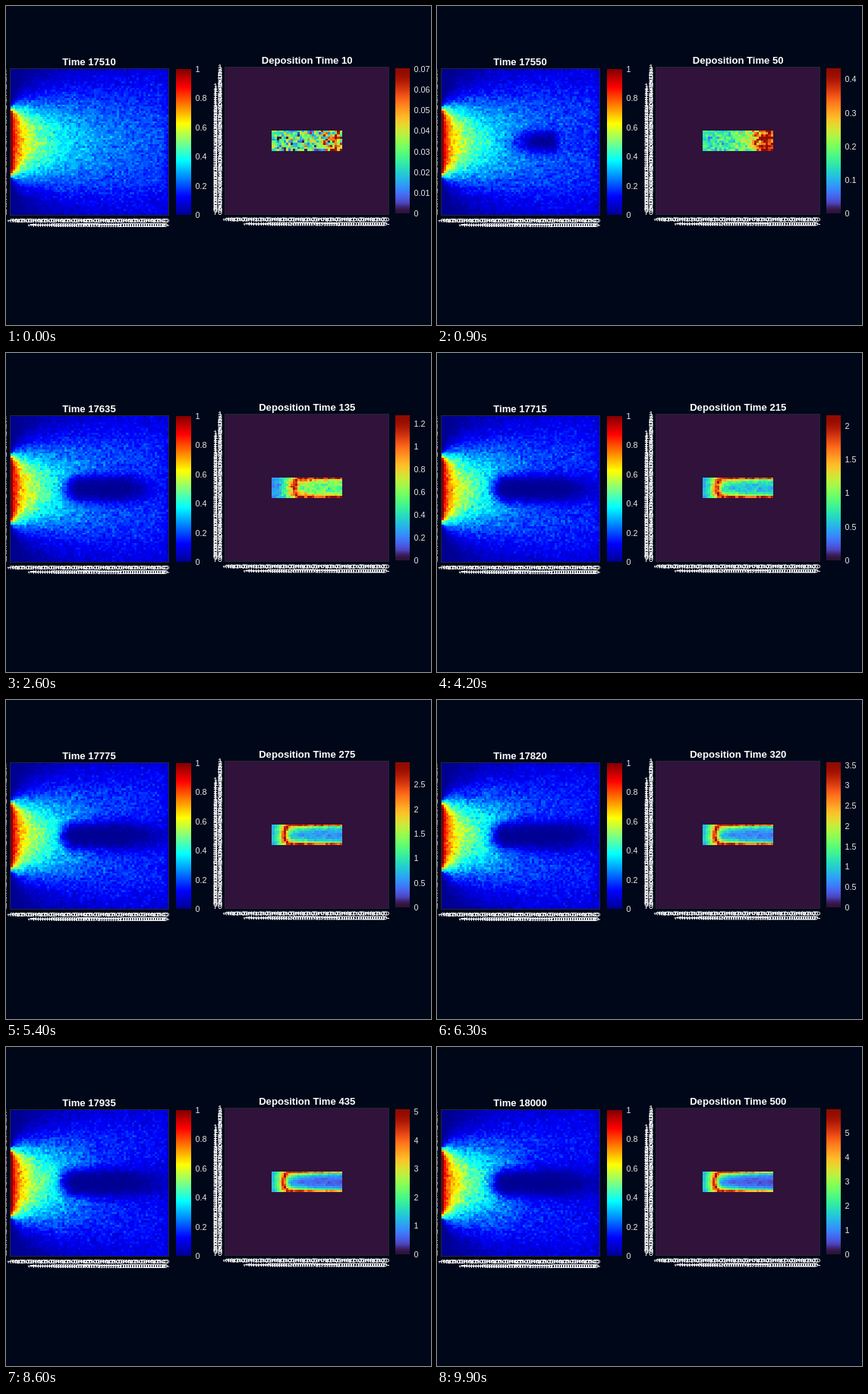
An HTML page with a canvas for the animation above (10 s loop, 560 px wide and 420 px high).

```html
<!DOCTYPE html>
<html lang="en">
<head>
<meta charset="utf-8">
<title>Deposition</title>
<style>
html, body { margin: 0; width: 100%; height: 100%; overflow: hidden; background: #000718; }
canvas { display: block; }
</style>
</head>
<body>
<canvas id="stage" width="560" height="420"></canvas>
<script>
const ctx = document.getElementById('stage').getContext('2d');
const FONT = '"Liberation Sans", Arial, sans-serif';
const N = 70, MID = (N - 1) / 2;
const LEFT = { x: 6, y: 83, w: 208, h: 192 };
const RIGHT = { x: 289, y: 81, w: 215, h: 192.5 };
const BLOCK = { i: 20, j: 30, w: 30, h: 10 };

const clamp = v => Math.max(0, Math.min(1, v));
const sigmoid = v => 1 / (1 + Math.exp(-v));
const bell = v => Math.exp(-v * v);

// how far the deposit has eaten its way to the left, 0 to 1
const progress = step => 1 / (1 + Math.pow(95 / step, 3.6));
const scaleTop = step =>
  0.0706 * Math.pow(step / 10, 1.134) * (1 - 0.07 * bell((step - 175) / 95));
const tickStep = top => {
  const unit = Math.pow(10, Math.floor(Math.log10(top / 7.2)));
  return unit * [1, 2, 5, 10].find(k => top / (k * unit) <= 7.2);
};

function random(seed) {
  return () => {
    seed = (seed + 0x6D2B79F5) | 0;
    let t = Math.imul(seed ^ (seed >>> 15), 1 | seed);
    t = (t + Math.imul(t ^ (t >>> 7), 61 | t)) ^ t;
    return ((t ^ (t >>> 14)) >>> 0) / 4294967296;
  };
}
const normal = rnd => (rnd() + rnd() + rnd() - 1.5) * 2;

function jet(v) {
  const u = 4 * clamp(v);
  const part = c => Math.round(255 * clamp(1.5 - Math.abs(u - c)));
  const blue = u < 0.5 ? Math.round(143 + 224 * u) : part(1);
  return `rgb(${part(3)},${part(2)},${blue})`;
}

const poly = (x, c) => c.reduceRight((sum, k) => sum * x + k, 0);
const TURBO = [
  [0.1357, 4.6154, -42.6603, 132.1311, -152.9424, 59.2864],
  [0.0914, 2.1942, 4.843, -14.185, 4.2773, 2.8296],
  [0.1067, 12.6419, -60.582, 110.3628, -89.9031, 27.3482]
];
const DARK = [48, 18, 59];
function turbo(v) {
  v = clamp(v);
  const mix = Math.min(1, v / 0.07);
  const rgb = TURBO.map((c, n) =>
    Math.round(DARK[n] + (255 * clamp(poly(v, c)) - DARK[n]) * mix));
  return `rgb(${rgb})`;
}

// undisturbed plume leaving the left wall
function plume(i, j) {
  const a = 44, d = i * LEFT.w / N, y = (j - MID) * LEFT.h / N;
  const axis = 1 / (1 + Math.pow(d / 35, 0.8));
  const w = 4.2 * Math.pow(d + 1.5, 0.62);
  const erf = v => Math.tanh(1.2 * v);
  const side = (erf((a - y) / w) + erf((a + y) / w)) / (2 * erf(a / w));
  return axis * side * (1 - 0.4 * Math.exp((d - LEFT.w) / 6));
}

const grainRnd = random(41);
const grain = Array.from({ length: BLOCK.w * BLOCK.h }, () => normal(grainRnd));

function cell(box, i, j, colour) {
  const x0 = Math.round(box.x + i * box.w / N), x1 = Math.round(box.x + (i + 1) * box.w / N);
  const y0 = Math.round(box.y + j * box.h / N), y1 = Math.round(box.y + (j + 1) * box.h / N);
  ctx.fillStyle = colour;
  ctx.fillRect(x0, y0, x1 - x0, y1 - y0);
}

function drawPlume(step) {
  const grown = progress(step), spread = Math.sqrt(grown), age = step / 500;
  const power = 1 - Math.exp(-Math.pow(step / 30, 3));
  const radius = 4 + 2.5 * spread;
  const nose = 47 - 25 * spread + radius;
  const lead = 0.4 + 0.6 * grown;
  const taper = 1.63 - 1.3 * spread;
  const wake = power * (0.2 + 0.3 * age), wakeWidth = 8.5 + 12.7 * age;
  const rnd = random(step * 977);
  for (let j = 0; j < N; j++) {
    for (let i = 0; i < N; i++) {
      const dy = j - MID;
      const dx = Math.max(0, nose - i) * lead + Math.max(0, i - 47) * taper;
      const hole = power * sigmoid((radius - Math.hypot(dx, dy)) / 1.4);
      const trail = wake * bell(dy / wakeWidth) * sigmoid((i - 33) / 4);
      let v = plume(i, j) * (1 - hole) * (1 - trail);
      v += normal(rnd) * 0.08 * Math.sqrt(Math.max(0, v * (1 - v)));
      cell(LEFT, i, j, jet(v));
    }
  }
}

function drawDeposit(step, top) {
  const grown = progress(step);
  const front = 26.5 - 22.2 * grown;
  const peak = 0.95 - 0.4 * Math.exp(-step / 30);
  const base = 0.35 - 0.33 * grown;
  const reach = 9 - 4.2 * grown;
  const floor = Math.min(peak, 0.5 / top);
  const noise = 0.32 * Math.sqrt(10 / step);
  ctx.fillStyle = turbo(0);
  ctx.fillRect(RIGHT.x, RIGHT.y, RIGHT.w, 193);
  for (let j = 0; j < BLOCK.h; j++) {
    for (let i = 0; i < BLOCK.w; i++) {
      const dx = Math.max(0, front + 3.2 - i) * 1.45;
      const depth = 4.7 - Math.hypot(dx, j - 4.5);
      const along = Math.max(0, i - front);
      const rim = peak * (1 - step / 1250 * along / 25);
      const inner = 1 + 2 * Math.exp(-along / 5);
      let v = depth < 0
        ? base + (rim - base) * Math.exp(depth / reach)
        : floor + (rim - floor) * Math.exp(-Math.max(0, depth - 0.2) / inner);
      v += grain[j * BLOCK.w + i] * noise * Math.sqrt(v);
      cell(RIGHT, BLOCK.i + i, BLOCK.j + j, turbo(Math.max(0.03, v)));
    }
  }
}

function text(str, x, y, align, size, weight = 'normal') {
  ctx.font = `${weight} ${size}px ${FONT}`;
  ctx.textAlign = align;
  ctx.fillText(str, x, y);
}

function frame(box) {
  ctx.strokeStyle = 'rgba(70,70,80,0.5)';
  ctx.lineWidth = 1;
  ctx.strokeRect(box.x - 0.5, box.y - 0.5, box.w + 1, Math.ceil(box.h) + 1);
}

function axisLabels(box, edge) {
  ctx.fillStyle = '#fff';
  ctx.textBaseline = 'middle';
  for (let n = 1; n <= N; n++) {
    const p = (n - 0.5) / N;
    text(n, edge, box.y + p * box.h, 'right', 10.8);
    ctx.save();
    ctx.translate(box.x + p * box.w, box.y + box.h + 4.5);
    ctx.rotate(-Math.PI / 2);
    text(n, 0, 0, 'right', 10.8);
    ctx.restore();
  }
}

function colourBar(x, y, w, h, map, top) {
  for (let k = 0; k < h; k++) {
    ctx.fillStyle = map(1 - (k + 0.5) / h);
    ctx.fillRect(x, y + k, w, 1);
  }
  ctx.fillStyle = '#e8e8e8';
  ctx.textBaseline = 'middle';
  const step = tickStep(top);
  for (let n = 0; n * step <= top + 1e-9; n++) {
    text(+(n * step).toFixed(2), x + w + 5.5, y + h - n * step / top * h + 1, 'left', 10.8);
  }
}

function draw(step) {
  const top = scaleTop(step);
  ctx.fillStyle = '#000718';
  ctx.fillRect(0, 0, 560, 420);
  drawPlume(step);
  drawDeposit(step, top);
  for (const box of [LEFT, RIGHT]) frame(box);
  axisLabels(LEFT, 1);
  axisLabels(RIGHT, 285);
  colourBar(224, 83, 20, 192, jet, 1);
  colourBar(513, 82, 19, 191, turbo, top);
  ctx.fillStyle = '#fff';
  ctx.textBaseline = 'alphabetic';
  text('Time ' + (17500 + step), 109.5, 78, 'center', 13.1, 'bold');
  text('Deposition Time ' + step, 396.7, 76, 'center', 13.1, 'bold');
}

let shown = -1;
const start = performance.now();
function tick(now) {
  const t = Math.max(0, now - start) % 10000;
  const step = 10 + 5 * Math.max(0, Math.floor(t / 100) - 1);
  if (step !== shown) draw(shown = step);
  requestAnimationFrame(tick);
}
tick(start);
</script>
</body>
</html>
```
